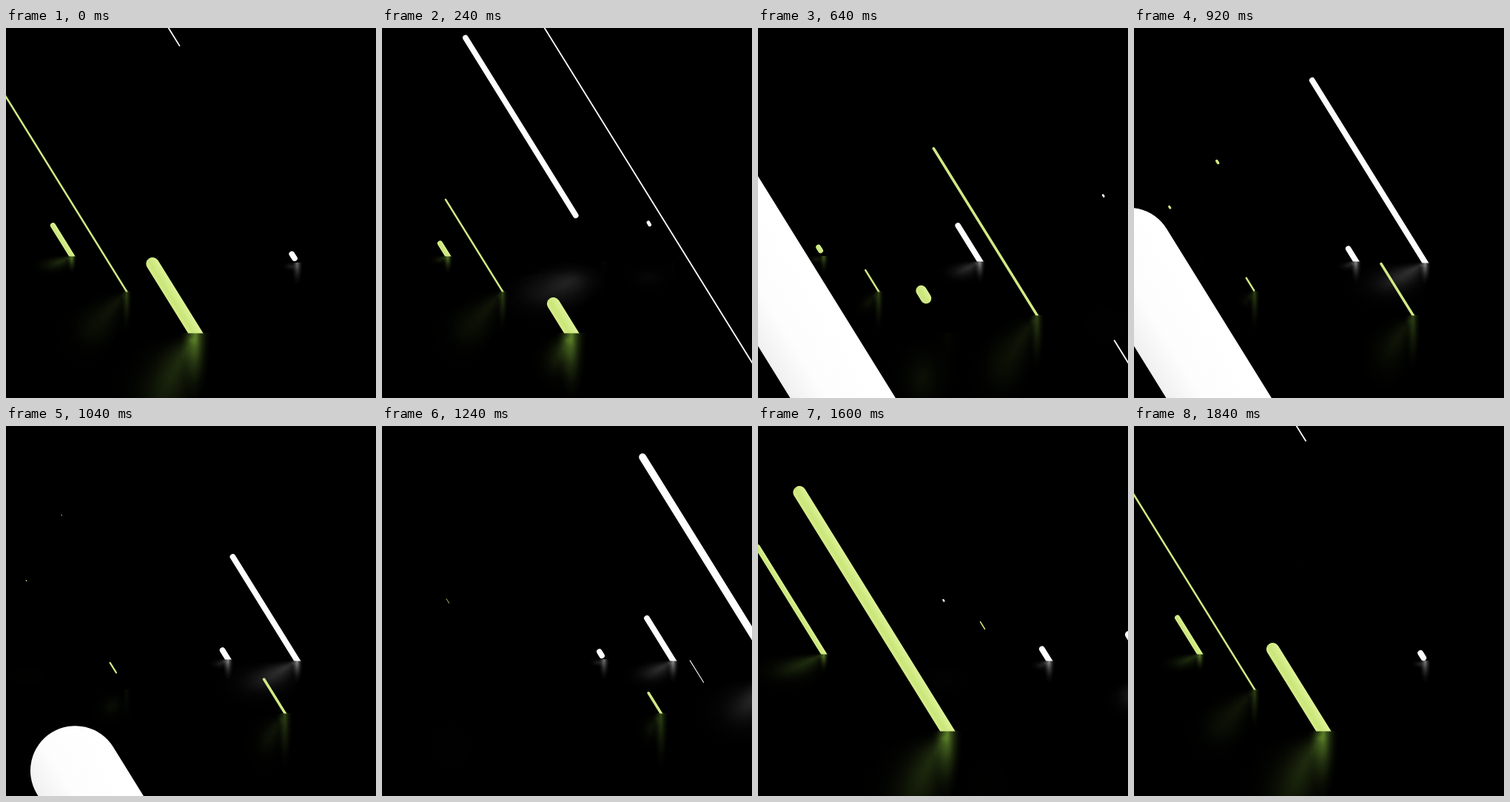
An HTML page with a canvas that plays this animation: 500x500 px, repeating every 1880 ms.

```html
<!DOCTYPE html>
<html lang="en">
<head>
<meta charset="utf-8">
<title>Falling light rods</title>
<style>
html, body { margin: 0; height: 100%; overflow: hidden; background: #000; }
canvas { display: block; width: 100vmin; height: 100vmin; }
</style>
</head>
<body>
<canvas id="stage" width="500" height="500"></canvas>
<script>
const ctx = document.getElementById('stage').getContext('2d');
const LOOP = 1880, SLOPE = 1.612, HORIZON = 270, DECAY = 205;
const NORMAL = [0.85, -0.527];
const LIME = { left: '#d6ed88', core: '#cae67a', right: '#def298', glow: '145,205,65' };
const WHITE = { left: '#ffffff', core: '#fdfdfd', right: '#ffffff', glow: '225,225,225' };

// x, y: where the rod meets the floor; r: radius; rest: height left once sunk
// sink: time when the remaining fall equals rest; lift: time it takes off again
const rods = [
  { x: 89, y: 308, r: 3.6, rest: 6, sink: 364, lift: 539, tint: LIME },
  { x: 300, y: 315, r: 3.8, rest: 6, sink: 1040, lift: 1175, tint: WHITE },
  { x: 393.5, y: 317, r: 3.9, rest: 7, sink: 1645, lift: 1810, tint: WHITE },
  { x: 537, y: 340, r: 5, rest: 8, sink: 1977, lift: 2075, tint: WHITE },
  { x: 163, y: 356, r: 1.25, rest: 13, sink: 681, lift: 885, tint: LIME, thin: true },
  { x: 377, y: 388, r: 1.75, rest: 16, sink: 1168, lift: 1286, tint: LIME, thin: true },
  { x: 256, y: 412, r: 8.7, rest: 15, sink: 340, lift: 447, tint: LIME },
  { x: 567, y: 560, r: 0.9, rest: 40, sink: 824, lift: 968, tint: WHITE, thin: true, hold: 540 },
  { x: 276, y: 760, r: 60.5, rest: 90, sink: 1209, lift: 1310, tint: WHITE }
];

const mod = (a, n) => ((a % n) + n) % n;

function easeInOut(p) {
  p = Math.min(1, Math.max(0, p));
  return p < 0.5 ? 2 * p * p : 1 - 2 * (1 - p) ** 2;
}

// Heights above the floor of both ends, and the current radius
function pose(rod, time) {
  const { rest, r, thin, hold } = rod;
  const start = rod.lift - 1100;
  const t = start + mod(time - start, LOOP);
  const fall = rest * Math.exp((rod.sink - t) / DECAY);
  if (t < rod.lift) {
    const top = rest + fall;
    let low = top - rest * (hold ? 43 : 40);
    if (hold) low = Math.min(low, hold);
    return { top, low: Math.max(low, -2 * r), r };
  }
  const reach = thin ? 15 : 21;
  const span = thin ? 658 : 775;
  const p = easeInOut((t - rod.lift) / span);
  const scale = 1 - p;
  const half = rest * (thin ? 1 : 0.55) / 2;
  const mid = rest - half + rest * reach * p;
  return { top: mid + (half + fall) * scale, low: mid - half * scale, r: r * scale ** 1.3 };
}

function clipped(y, h, draw) {
  ctx.save();
  ctx.beginPath();
  ctx.rect(0, y, 500, h);
  ctx.clip();
  draw();
  ctx.restore();
}

function blob(x, y, rx, ry, rgb, alpha) {
  ctx.save();
  ctx.translate(x, y);
  ctx.scale(rx, ry);
  const g = ctx.createRadialGradient(0, 0, 0, 0, 0, 1);
  [1, 0.6, 0.28, 0.08, 0].forEach((k, i) => g.addColorStop(i / 4, `rgba(${rgb},${alpha * k})`));
  ctx.fillStyle = g;
  ctx.fillRect(-1, -1, 2, 2);
  ctx.restore();
}

// Rough floor reflection: a bright streak at the foot and a fan leaning left
function reflect(rod, { top, low, r }) {
  if (rod.y > 500 || r < 0.05) return;
  const { x, y, tint } = rod;
  const depth = y - HORIZON;
  const flat = depth / 142;
  const power = (r / rod.r) * (rod.thin ? 0.55 : 1);
  const from = Math.max(0, low);
  clipped(y, 500, () => {
    ctx.globalCompositeOperation = 'lighter';
    blob(x, y, r * 1.2 + depth * 0.07, depth * 0.65, tint.glow, 0.6 * power / (1 + (from / 12) ** 2));
    for (let i = 1; i <= 10; i++) {
      const h = from + i * 10;
      if (h > top + 10) break;
      const drop = flat * h;
      blob(x - h * 0.55, y + drop, h * 0.6 + r, drop + 2, tint.glow,
        0.2 * power / (1 + (h / 30) ** 1.5));
    }
  });
}

function drawRod(rod, { top, low, r }) {
  if (r < 0.02) return;
  const { x, y, tint } = rod;
  const [nx, ny] = NORMAL;
  const g = ctx.createLinearGradient(x - nx * r, y - ny * r, x + nx * r, y + ny * r);
  g.addColorStop(0, r > 20 ? '#f0f0f0' : tint.left);
  g.addColorStop(0.35, tint.core);
  g.addColorStop(1, tint.right);
  clipped(-10, y + 10.5, () => {
    ctx.strokeStyle = g;
    ctx.lineWidth = 2 * r;
    ctx.lineCap = 'round';
    ctx.beginPath();
    ctx.moveTo(x - low / SLOPE, y - low);
    ctx.lineTo(x - top / SLOPE, y - top);
    ctx.stroke();
  });
}

const begin = performance.now();
function frame() {
  const time = (performance.now() - begin) % LOOP;
  ctx.fillStyle = '#000';
  ctx.fillRect(0, 0, 500, 500);
  const poses = rods.map(rod => pose(rod, time));
  rods.forEach((rod, i) => reflect(rod, poses[i]));
  rods.forEach((rod, i) => drawRod(rod, poses[i]));
  requestAnimationFrame(frame);
}
frame();
</script>
</body>
</html>
```
